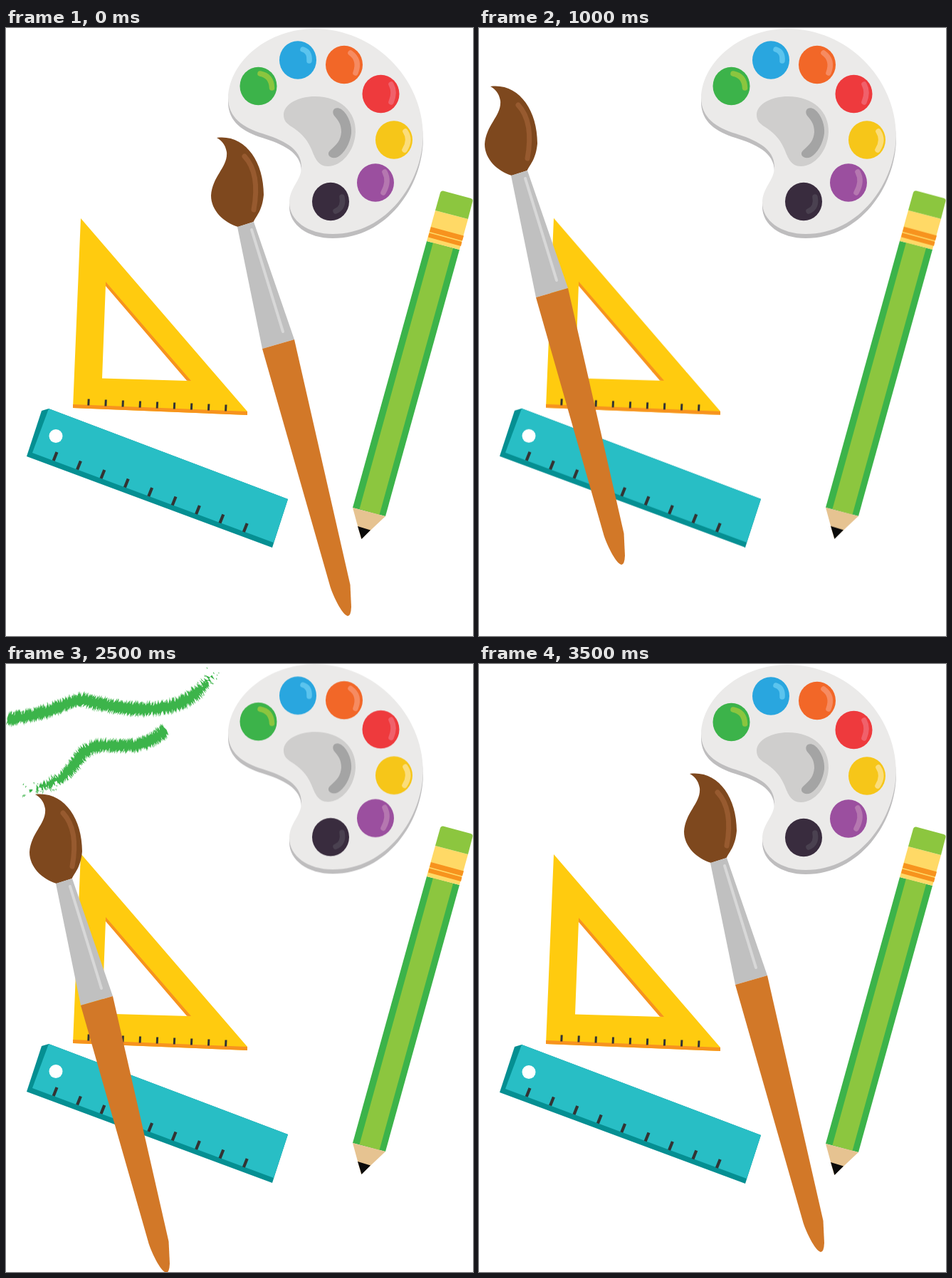
An HTML page that plays this animation: 656 by 853 pixels, repeating every 4 s.

```html
<!DOCTYPE html>
<html lang="en">
<head>
<meta charset="utf-8">
<title>Art supplies</title>
<style>
html, body { margin: 0; width: 100%; height: 100%; overflow: hidden; background: #fff; }
svg { display: block; width: 100vw; height: 100vh; }
.line { fill: none; stroke-linecap: round; }
.tools, .palette, .brush, .paint path { animation: 4s step-end infinite; }
.tools { animation-name: tools; }
.palette { animation-name: palette; }
.brush { animation-name: brush; }
.paint path { fill: #3cb44a; opacity: 0; }
.paint .begin { animation-name: begin; }
.paint .first, .paint .second { animation-name: upper; }
.paint .third { animation-name: lower; }
@keyframes brush {
  0%, 87.5%, 100% { transform: translate(0, 0); }
  12.5%, 75% { transform: translate(50px, -58px); }
  25% { transform: translate(-280px, -72px); }
  50% { transform: translate(-57px, -76.5px); }
  62.5% { transform: translate(-255px, 29px); }
}
@keyframes tools {
  0%, 37.5%, 87.5%, 100% { transform: translateY(0); }
  12.5% { transform: translateY(-.7px); }
  25% { transform: translateY(-.3px); }
  50% { transform: translateY(-1px); }
}
@keyframes palette {
  0%, 75%, 100% { transform: translateY(0); }
  37.5% { transform: translateY(.7px); }
  50% { transform: translateY(-.7px); }
}
@keyframes begin { 0%, 50%, 100% { opacity: 0; } 37.5% { opacity: 1; } }
@keyframes upper { 0%, 87.5%, 100% { opacity: 0; } 50% { opacity: 1; } }
@keyframes lower { 0%, 87.5%, 100% { opacity: 0; } 62.5% { opacity: 1; } }
</style>
</head>
<body>
<svg viewBox="0 0 656 853" preserveAspectRatio="none">
  <defs>
    <path id="board" d="M433 1C517 1 585 70 586 150C585 217 535 289 459 289C424 289 398 270 398 245C398 224 415 214 415 195C415 168 388 157 360 148C334 140 312 126 312 98C314 45 370 1 433 1Z"/>
  </defs>

  <g class="palette">
    <use href="#board" y="6" fill="#bebdbe"/>
    <use href="#board" fill="#ebeae9"/>
    <path fill="#cfcecd" d="M390 122C390 106 412 96 434 96C470 96 492 118 491 146C490 172 472 194 452 194C438 194 434 182 429 170C421 152 412 146 402 139C394 134 390 130 390 122Z"/>
    <path fill="#a4a4a4" d="M461 123C456 115 463 109 471 114C482 122 486 138 485 148C483 163 475 176 466 181C457 185 449 178 455 172C465 163 470 158 471 146C471 135 467 130 461 123Z"/>
    <g id="wells"></g>
  </g>

  <g class="tools">
    <path fill="#ffcb0f" fill-rule="evenodd" d="M105 267L339 538V543L94 533ZM140 360L135 491.5L256 495Z"/>
    <path fill="#f7931e" d="M94 528L339 538V543L94 533ZM140 356L260 495L254 494.8L140 362Z"/>
    <path fill="#058f92" d="M50 537L60 534L396 661L374 729L29 601Z"/>
    <path fill="#28bec5" d="M60 534L396 661L376 722L37 596Z"/>
    <circle cx="70" cy="572.5" r="9.5" fill="#fff"/>
    <path id="ticks" class="line" stroke="#333" style="stroke-linecap:butt"/>
    <path id="marks" class="line" stroke="#333" style="stroke-linecap:butt"/>

    <path fill="#3cb34a" d="M591 299L637 311L533 685L487 673Z"/>
    <path fill="#8cc63f" d="M600 301L628 309L524.5 683L496.5 675Z"/>
    <path fill="#ffd966" d="M603 256L649 268L637 311L591 299Z"/>
    <path fill="#f7931e" d="M597 279L643 291.500L641 298.500L595 286ZM594.500 287.500L640.500 300L639 306L593 293.500Z"/>
    <path fill="#8cc63f" d="M603 256L610 231Q611 228 614 228.500L653 239Q656 240 655.500 243L649 268Z"/>
    <path fill="#e6c391" d="M487 673L533 685L499 717Z"/>
    <path fill="#0a0a0a" d="M494 699L512 704.500L499.500 717Z"/>
  </g>

  <g class="brush">
    <path fill="#7e481e" d="M296 154C335 149 362 186 362 234C360 255 353 262 347.500 272L326 279C306 273 288 256 288 235C290 207 312 195 310 174C308 163 303 158 296 154Z"/>
    <path class="line" stroke="#975a2f" stroke-width="7" d="M335 180C350 196 354 222 348 255"/>
    <path fill="#c0c0c0" d="M325 279L348 272L405 437L360 450Z"/>
    <path class="line" stroke="#d8d8d8" stroke-width="4" d="M345 283L389 426"/>
    <path fill="#d27828" d="M360 450L405 437L483.500 781L485 812Q484.500 825 480 825C472 823 460 798 455.500 784Z"/>
  </g>

  <g class="paint">
    <path class="begin"/>
    <path class="first"/>
    <path class="second"/>
    <path class="third"/>
  </g>
</svg>
<script>
const SVG = 'http://www.w3.org/2000/svg';
const $ = sel => document.querySelector(sel);

function add(parent, tag, attrs) {
  const el = document.createElementNS(SVG, tag);
  for (const key in attrs) el.setAttribute(key, attrs[key]);
  parent.append(el);
}

// x, y, colour, highlight colour, highlight curve
[
  [354.5, 81.5, '#3cb34a', '#8bc53f', 'M357 64Q373 67 373.500 84'],
  [410, 45, '#29a6df', '#5bc4ee', 'M417 30Q427 33 426 46'],
  [475, 51.5, '#f26728', '#f68b61', 'M484 35Q498 45 491 63'],
  [526.5, 92.5, '#ee3a3d', '#f0616b', 'M541 79Q547 90 541 104'],
  [545, 157, '#f6c619', '#fbdd7b', 'M561 145Q569 157 560 171'],
  [519, 217, '#9b4f9f', '#b577b0', 'M532 202Q539 215 530 231'],
  [456, 243.5, '#392c3e', '#4a4150', 'M472 237Q475 252 463 257']
].forEach(([cx, cy, fill, stroke, d]) => {
  add($('#wells'), 'ellipse', { cx, cy, rx: 26, ry: 26.8, fill });
  add($('#wells'), 'path', { d, stroke, class: 'line', 'stroke-width': 7.5 });
});

function repeat(id, width, mark) {
  $(id).setAttribute('d', Array.from({ length: 9 }, (_, i) => mark(i)).join(''));
  $(id).setAttribute('stroke-width', width);
}
repeat('#ticks', 3, i => `M${116.2 + i * 24.1} ${520.5 + i}l-.4 9`);
repeat('#marks', 4.2, i => `M${71.5 + i * 33.4} ${595 + i * 12.5}l-4.800 12`);

function random(seed) {
  return () => (seed = seed * 16807 % 2147483647) / 2147483647;
}

// Bristle stroke: spikes across the curve, thinning to specks after `solid`
function smear(name, curve, half, solid, seed) {
  const el = $('.paint .' + name), rnd = random(seed);
  el.setAttribute('d', curve);
  const len = el.getTotalLength();
  let d = '';
  const spike = (x, y, angle, size, base) => {
    const c = Math.cos(angle), s = Math.sin(angle);
    const pts = [[x + s * base, y - c * base], [x + c * size, y + s * size], [x - s * base, y + c * base]];
    d += 'M' + pts.map(p => p.map(v => v.toFixed(1)).join(' ')).join('L') + 'Z';
  };
  for (let at = 0; at < len; at += .7) {
    const p = el.getPointAtLength(at), q = el.getPointAtLength(Math.max(0, at - 4));
    const r = el.getPointAtLength(Math.min(len, at + 4));
    const normal = Math.atan2(r.y - q.y, r.x - q.x) + Math.PI / 2;
    const fade = at / len < solid ? 1 : (1 - at / len) / (1 - solid);
    for (const side of [0, Math.PI]) {
      const angle = normal + side + .25 + (rnd() - .5) * .6;
      const size = half * (.65 + rnd() * .45);
      if (rnd() < fade * fade * 1.1) spike(p.x, p.y, angle, size * (.5 + fade / 2), 1.7);
      else if (rnd() < .2 + fade * .4) {
        const off = (rnd() - .5) * 1.8 * half;
        spike(p.x + Math.cos(normal) * off, p.y + Math.sin(normal) * off, angle, 2 + rnd() * 3, .7);
      }
    }
  }
  el.setAttribute('d', d);
}

smear('begin', 'M3 77C40 74 70 62 88 55S110 48 120 46', 11.5, .66, 71);
smear('first', 'M3 77C40 74 70 62 88 55L105 49', 11.5, 1, 71);
smear('second', 'M105 49C140 59 178 65 205 63C250 60 275 42 293 8', 12, .78, 913);
smear('third', 'M224 93C205 108 190 115 165 115S125 112 112 122S92 154 66 166S35 176 20 177', 11.5, .62, 4021);
</script>
</body>
</html>
```
